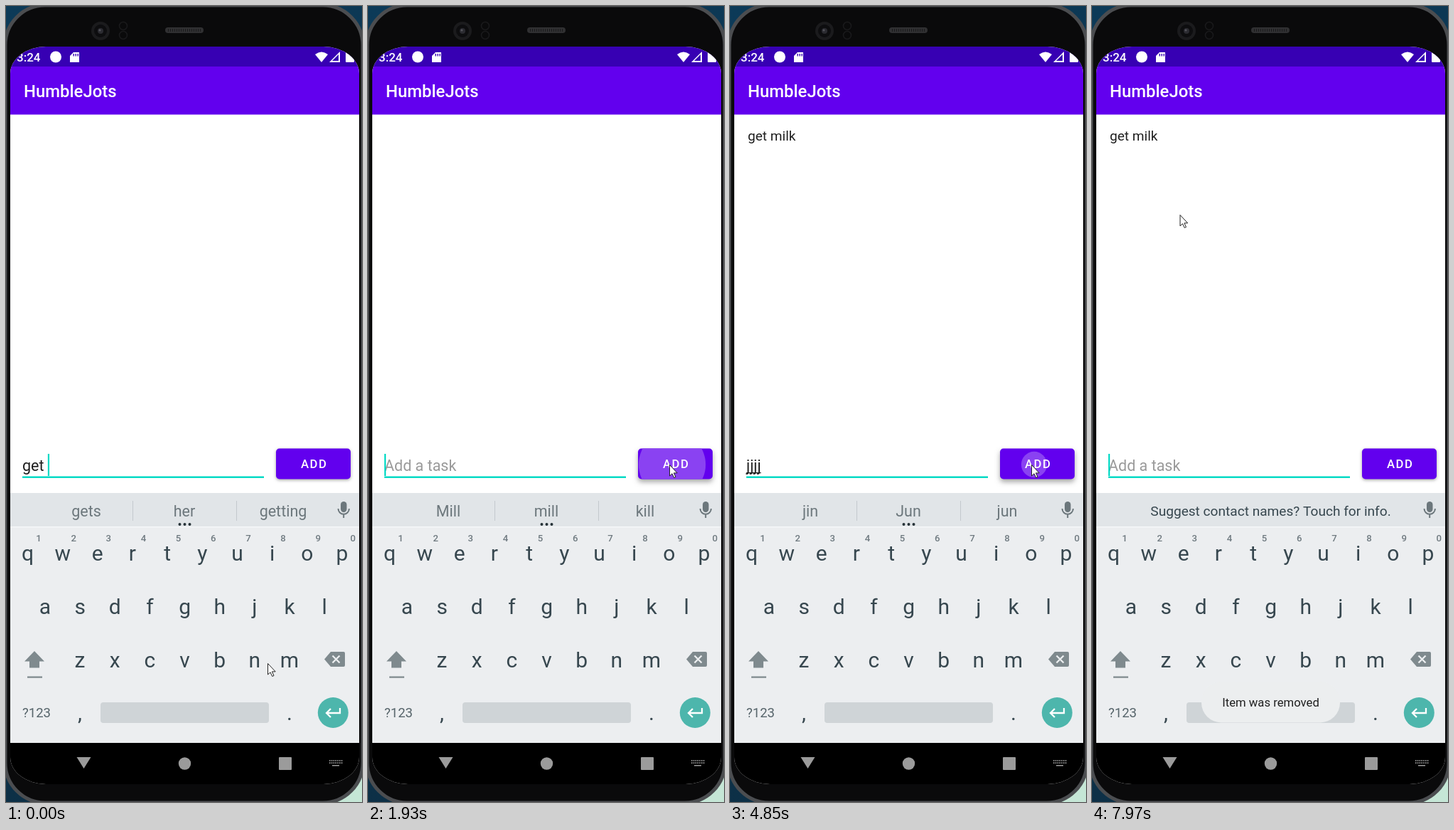
These frames come from a looping animation (501 by 1118 pixels, 8000 ms). An HTML page with a canvas:

```html
<!DOCTYPE html>
<html lang="en">
<head>
<meta charset="utf-8">
<style>
html, body { margin: 0; width: 100%; height: 100%; overflow: hidden; background: #000; }
canvas { display: block; }
</style>
</head>
<body>
<canvas id="stage" width="501" height="1118"></canvas>
<script>
const c = document.getElementById('stage').getContext('2d');
const LOOP = 8000, KEY = 49.15;

const times = [0];
for (const [a, b, n] of [[150, 1080, 8], [1220, 1930, 6], [2050, 2170, 2], [2300, 2540, 3],
  [2940, 3900, 8], [4040, 4180, 2], [4315, 4990, 6], [5110, 6060, 8], [6180, 6300, 2],
  [6580, 7210, 6], [7580, 7970, 4]])
  for (let i = 0; i < n; i++) times.push(a + (b - a) * i / (n - 1));

// Input field: [time, committed text, word being composed, suggestions]
const typing = [
  [0, 'get ', '', 'gets her getting'],
  [410, 'get ', 'm', 'me my more'],
  [810, 'get ', 'mi', 'mi mid min'],
  [1075, 'get ', 'mil', 'mid in mile'],
  [1360, 'get ', 'milk', 'Mill mill kill'],
  [1925, '', '', 'Mill mill kill'],
  [3210, '', 'j', 'just Jun jun'],
  [3620, '', 'jj', 'jin Jun jun'],
  [3890, '', 'jjj', 'jin Jun jun'],
  [4175, '', 'jjjj', 'jin Jun jun'],
  [4800, '', '', 'jin Jun jun']
];
const presses = [['m', 280, 520], ['i', 675, 940], ['l', 940, 1200], ['k', 1210, 1490],
  ['j', 3070, 3340], ['j', 3480, 3615], ['j', 3755, 3890], ['j', 4030, 4300]];
const mouse = [[0, 368, 923], [283, 394, 925], [416, 394, 925], [681, 371, 776], [814, 371, 776],
  [947, 442, 845], [1080, 407, 846], [1362, 401, 844], [1788, 424, 644], [2170, 424, 644],
  [2540, 322.5, 797], [2940, 322.5, 797], [3077, 359, 831], [4180, 359, 831], [4585, 424, 644],
  [5110, 424, 644], [6060, 80, 250], [6180, 77.5, 205.5], [6300, 87, 198], [6580, 87, 198],
  [6832, 34, 237], [7580, 34, 237], [7970, 123.5, 293]];
const rows = [['qwertyuiop', 30.5, 779], ['asdfghjkl', 55, 854], ['zxcvbnm', 104, 928.5]];

const clamp = v => Math.max(0, Math.min(1, v));

function text(s, x, y, size, color, align = 'left', weight = 400) {
  c.font = `${weight} ${size}px Roboto, sans-serif`;
  c.textAlign = align;
  c.fillStyle = color;
  c.fillText(s, x, y);
}
function rect(x, y, w, h, color, r = 0) {
  c.fillStyle = color;
  c.beginPath();
  c.roundRect(x, y, w, h, r);
  c.fill();
}
function disc(x, y, r, color) {
  c.fillStyle = color;
  c.beginPath();
  c.arc(x, y, r, 0, 7);
  c.fill();
}
function shape(d, fill, stroke, width = 1) {
  const p = new Path2D(d);
  if (fill) { c.fillStyle = fill; c.fill(p); }
  if (stroke) { c.strokeStyle = stroke; c.lineWidth = width; c.stroke(p); }
}
function shadow(blur, dy, color) {
  c.shadowBlur = blur;
  c.shadowOffsetY = dy;
  c.shadowColor = color;
}
function faded(alpha, draw) {
  if (alpha <= 0) return;
  c.save();
  c.globalAlpha = clamp(alpha);
  draw();
  c.restore();
}

function drawPhone() {
  const bg = c.createLinearGradient(0, 0, 501, 1118);
  bg.addColorStop(0, '#0c3a58');
  bg.addColorStop(.9, '#0d2f45');
  bg.addColorStop(.97, '#c5e6d6');
  c.fillStyle = bg;
  c.fillRect(0, 0, 501, 1118);
  rect(-1, -1, 503, 1120, '#0a0a0b', 56);
  c.strokeStyle = '#4b4d50';
  c.lineWidth = 5;
  c.stroke();
  disc(133, 35, 13, '#1b1b1d');
  disc(133, 35, 9, '#0d0d0f');
  disc(133, 35, 4, '#2b2b31');
  disc(132, 34, 1.5, '#55555c');
  for (const y of [28, 41]) {
    c.strokeStyle = '#1a1a1c';
    c.lineWidth = 1.5;
    c.beginPath();
    c.arc(165, y, 5.5, 0, 7);
    c.stroke();
  }
  rect(224, 30, 54, 8, '#303032', 4);
  for (let x = 228; x < 276; x += 3) rect(x, 32, 1, 4, '#19191a');
}

function drawBars() {
  rect(6, 57, 491, 28, '#3700b3');
  rect(6, 85, 491, 67.5, '#6200ee');
  text('3:24', 48.5, 78, 17, '#fff', 'right', 500);
  disc(70, 71.5, 8, '#fff');
  shape('M95 65h8v14h-13v-9z', '#fff');
  for (const x of [94.5, 97.5, 100.5]) rect(x, 67, 1.4, 3.5, '#3700b3');
  shape('M435 68Q444 61 453 68L444 79z', '#fff');
  shape('M470 64v15h-15z', '#fff');
  shape('M468 68v9h-9z', '#3700b3');
  rect(478, 65, 12, 14, '#fff', 1);
  text('HumbleJots', 25, 128, 23.9, '#fff', 'left', 500);
  rect(6, 1035, 491, 83, '#000');
  shape('M99.5 1055h20l-10 16z', '#9b9b9b');
  disc(251.5, 1064, 8.7, '#9b9b9b');
  rect(384, 1055, 18, 18, '#9b9b9b', 1);
  for (let i = 0; i < 14; i++) rect(455 + i % 7 * 2.8, 1059 + (i / 7 | 0) * 3.2, 1.6, 1.8, '#9b9b9b');
  rect(459, 1066, 10, 1.6, '#9b9b9b');
}

function drawList(t) {
  faded((t - 2000) / 120, () => text('get milk', 25, 188.5, 19.1, '#1f1f1f'));
  faded(t < 7500 ? (t - 4870) / 120 : (7700 - t) / 200, () => text('jjjj', 25, 246, 19.1, '#1f1f1f'));
}

function drawInput(t, [since, done, word]) {
  const size = 21.5, x = 23;
  if (done + word) text(done + word, x, 653, size, '#1f1f1f');
  else text('Add a task', x, 652.5, size, '#9a9a9a');
  const start = x + c.measureText(done).width;
  const end = done + word ? x + c.measureText(done + word).width : x;
  if (word) rect(start, 655, end - start, 1.3, '#1f1f1f');
  rect(23, 660.5, 340, 2.5, '#03dac5');
  if (Math.floor((t - since) / 500) % 2 === 0) rect(end, 629, 2.2, 31, '#03dac5');
}

function drawButton(t) {
  const age = t < 4000 ? t - 1785 : t - 4710;
  const active = age >= 0 && age < 700;
  c.save();
  shadow(active ? 7 : 4, active ? 4 : 1.5, 'rgba(0,0,0,.35)');
  rect(380, 621.5, 105, 43, '#6200ee', 4.8);
  shadow(0, 0, 'transparent');
  c.clip();
  if (active) faded((700 - age) / 350, () => disc(428, 644, 16 + age * .215, '#8a42f2'));
  c.restore();
  c.letterSpacing = '1.5px';
  text('ADD', 433.7, 649, 16.7, '#fff', 'center', 500);
  c.letterSpacing = '0px';
}

function drawSuggestions(t, [since, done, word, list]) {
  rect(6, 684, 491, 47, '#e1e5e8');
  rect(6, 731, 491, 1.5, '#f6f8f9');
  if (!(done + word) && t > since + 300) {
    text('Suggest contact names? Touch for info.', 251.5, 716, 19.1, '#37474f', 'center');
  } else {
    list.split(' ').forEach((s, i) => text(s, [113, 251, 390][i], 717, 21.5, '#6c777c', 'center'));
    for (const x of [178, 324]) rect(x, 695, 1, 28, '#c3c9cd');
    for (const x of [244.5, 251.5, 258.5]) disc(x, 728, 2, '#263238');
  }
  rect(471, 696, 8.5, 15, '#6c777c', 4.2);
  shape('M467.5 706a7.7 7.7 0 0 0 15.4 0M475.2 714v5', null, '#6c777c', 2);
}

function drawKeyboard() {
  rect(6, 731, 491, 304, '#eceef0');
  for (const [keys, x, y] of rows)
    [...keys].forEach((k, i) => text(k, x + i * KEY, y, 30, '#37474f', 'center'));
  [...'1234567890'].forEach((n, i) => text(n, 46 + i * KEY, 752, 13.2, '#6f7a80', 'center', 500));
  shape('M40 906l14 14.5h-7v9h-14v-9h-7z', '#7f8a8e');
  rect(30, 941.5, 21, 2.2, '#7f8a8e');
  shape('M457 907h18q2 0 2 2v17q0 2-2 2h-18l-9-10.5z', '#7f8a8e');
  shape('M459.5 912.5l10 10m0-10l-10 10', null, '#eceef0', 2.3);
  text('?123', 43, 999, 18.5, '#56646a', 'center');
  text(',', 104, 1003, 30, '#37474f', 'center');
  text('.', 399, 1003, 30, '#37474f', 'center');
  rect(133, 978, 237, 29, '#cfd4d7', 4);
  disc(460.3, 992.5, 21.5, '#4db6ac');
  shape('M470 986v7h-19m6-6l-6 6l6 6', null, '#fff', 2.3);
}

function drawPopup(t) {
  const press = presses.find(p => t >= p[1] && t < p[2]);
  if (!press) return;
  const [keys, x0, y] = rows.find(r => r[0].includes(press[0]));
  const x = x0 + keys.indexOf(press[0]) * KEY;
  c.save();
  shadow(4, 2, 'rgba(0,0,0,.45)');
  rect(x - 29.5, y - 124, 59, 136, '#cfd5d8', 3);
  c.restore();
  text(press[0], x, y - 73, 44, '#37474f', 'center');
}

function drawToast(t) {
  const removed = t > 7500;
  const alpha = removed ? (t - 7500) / 250
    : t < 4500 ? Math.min((t - 2050) / 240, (4320 - t) / 280)
    : Math.min((t - 5000) / 220, (7210 - t) / 280);
  const half = removed ? 97.5 : 88;
  faded(alpha, () => {
    rect(251.5 - half, 949, half * 2, 57.5, '#eceeef', 28);
    text(removed ? 'Item was removed' : 'Item was added', 251.5, 984, 16.7, '#202020', 'center');
  });
}

function drawMouse(t) {
  let i = mouse.findIndex(m => m[0] > t + .01);
  if (i < 0) i = mouse.length - 1;
  const a = mouse[i - 1], b = mouse[i], f = clamp((t - a[0]) / (b[0] - a[0]));
  c.save();
  c.translate(a[1] + (b[1] - a[1]) * f, a[2] + (b[2] - a[2]) * f);
  shape('M.5 .5v15.5l3.5-3.2 2.7 5.7 2.3-1-2.6-5.6h4.8z', '#fff', '#222');
  c.restore();
}

function draw(now) {
  const clock = now % LOOP;
  const t = times.filter(v => v <= clock).pop();
  const input = typing.filter(e => e[0] <= t).pop();
  const corner = { x: 50, y: 38 };
  drawPhone();
  c.save();
  c.beginPath();
  c.roundRect(6, 57, 491, 1036, corner);
  c.clip();
  rect(6, 57, 491, 1036, '#fff');
  drawBars();
  drawList(t);
  drawInput(t, input);
  drawButton(t);
  drawKeyboard();
  drawSuggestions(t, input);
  drawPopup(t);
  drawToast(t);
  c.restore();
  drawMouse(t);
}

const begin = performance.now();
function tick() {
  draw(performance.now() - begin);
  requestAnimationFrame(tick);
}
tick();
</script>
</body>
</html>
```
